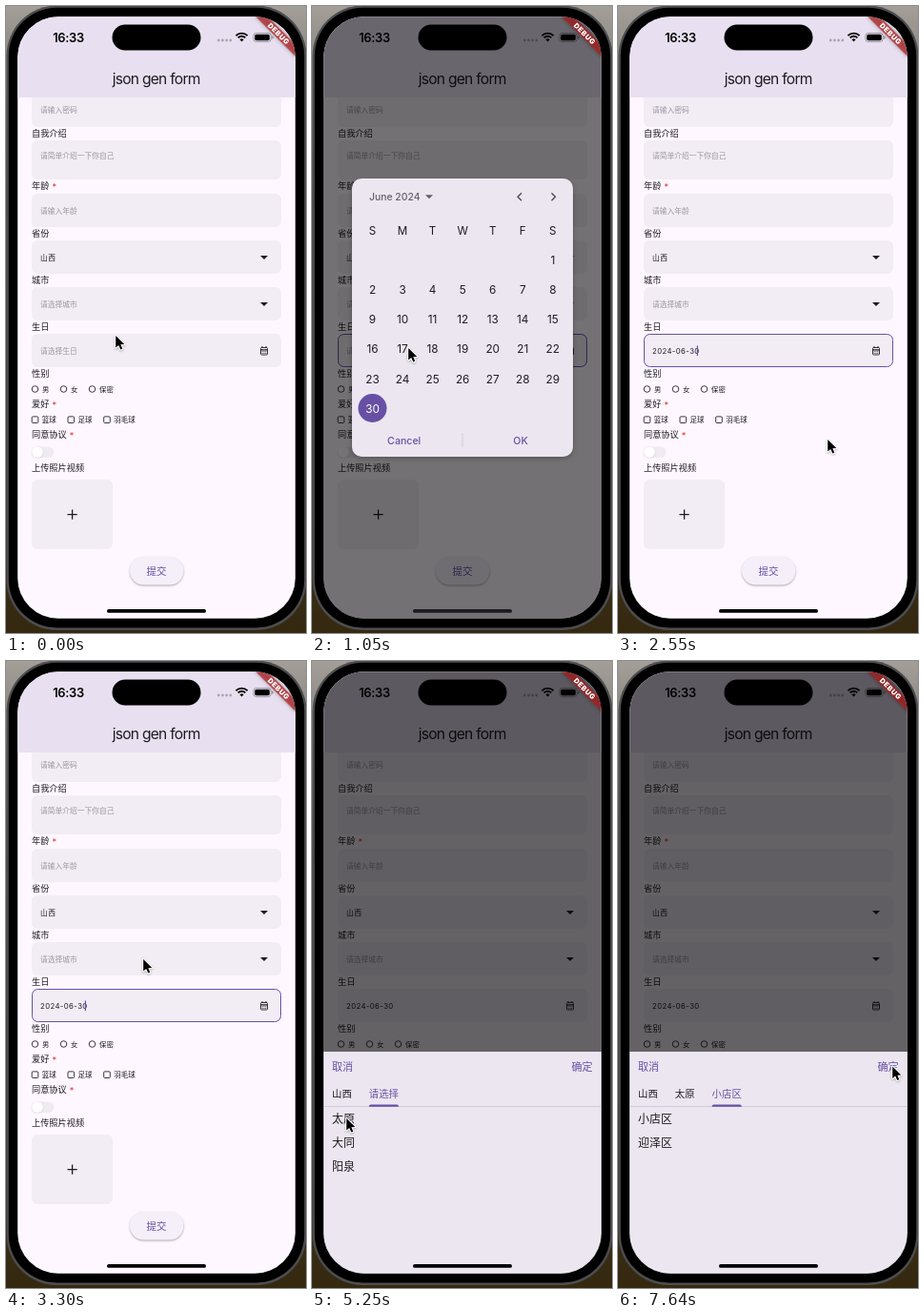
These frames come from a looping animation (315x658 px, 8 s). An HTML page with a canvas:

```html
<!DOCTYPE html>
<html lang="zh-CN">
<head>
<meta charset="utf-8">
<title>json gen form</title>
<style>
html, body { margin: 0; width: 100%; height: 100%; overflow: hidden; background: #000; }
canvas { display: block; width: 315px; height: 658px; }
</style>
</head>
<body>
<canvas id="stage"></canvas>
<script>
const W = 315, H = 658, LOOP = 8000;
const INK = '#1d1b20', HINT = '#9b96a0', PURPLE = '#6750a4', FIELD = '#f2ecf5', SHEET = '#ece6f0';
const FAMILY = 'Inter, "Noto Sans CJK SC", "Noto Sans CJK", sans-serif';

const canvas = document.getElementById('stage');
const ctx = canvas.getContext('2d');
const ratio = window.devicePixelRatio || 1;
canvas.width = W * ratio;
canvas.height = H * ratio;

function box(x, y, w, h, r, fill, stroke, line = 1) {
  ctx.beginPath();
  ctx.roundRect(x, y, w, h, r);
  if (fill) { ctx.fillStyle = fill; ctx.fill(); }
  if (stroke) { ctx.strokeStyle = stroke; ctx.lineWidth = line; ctx.stroke(); }
}

function disc(x, y, r, fill, stroke) {
  ctx.beginPath();
  ctx.arc(x, y, r, 0, Math.PI * 2);
  if (fill) { ctx.fillStyle = fill; ctx.fill(); }
  if (stroke) { ctx.strokeStyle = stroke; ctx.lineWidth = 1; ctx.stroke(); }
}

function poly(points, fill) {
  ctx.beginPath();
  points.forEach(([x, y]) => ctx.lineTo(x, y));
  ctx.closePath();
  ctx.fillStyle = fill;
  ctx.fill();
}

function strokeLine(points, color, width) {
  ctx.beginPath();
  points.forEach(([x, y], i) => i ? ctx.lineTo(x, y) : ctx.moveTo(x, y));
  ctx.strokeStyle = color;
  ctx.lineWidth = width;
  ctx.stroke();
}

// y is the vertical middle of the text
function text(str, x, y, size, color = INK, { align = 'left', weight = 400, spacing = 0 } = {}) {
  ctx.font = `${weight} ${size}px ${FAMILY}`;
  ctx.letterSpacing = spacing + 'px';
  ctx.textAlign = align;
  ctx.fillStyle = color;
  ctx.fillText(str, x, y + size * 0.37);
}

function shadow(color, blur, dy) {
  ctx.shadowColor = color;
  ctx.shadowBlur = blur * ratio;
  ctx.shadowOffsetY = dy * ratio;
}
const noShadow = () => shadow('transparent', 0, 0);

const arrowDown = (x, y, color = INK) => poly([[x - 4, y - 2], [x + 4, y - 2], [x, y + 2]], color);

function label(str, y, required) {
  text(str, 27, y, 9.2);
  if (required) text('*', 27 + str.length * 9.2 + 3, y + 0.5, 9.2, '#e5322d');
}

function field(y, h, str, filled, border) {
  box(27, y, 262, h, 6, FIELD);
  if (border) box(27.5, y + 0.5, 261, h - 1, 6, null, border);
  const color = filled ? INK : HINT;
  text(str, 36, y + (h > 36 ? 16.5 : 18), 7.75, color, { spacing: filled ? 0.4 : 0 });
}

function calendarIcon(x, y) {
  box(x - 3.5, y - 3.5, 7, 7.5, 1, null, INK, 0.9);
  strokeLine([[x - 3.5, y - 1.2], [x + 3.5, y - 1.2]], INK, 1.2);
  [-2, 2].forEach(d => strokeLine([[x + d, y - 5], [x + d, y - 3]], INK, 1));
  [-1.8, 0, 1.8].forEach(dx => [0.7, 2.4].forEach(dy => {
    ctx.fillStyle = INK;
    ctx.fillRect(x + dx - 0.45, y + dy - 0.45, 0.9, 0.9);
  }));
}

function form(t) {
  ctx.fillStyle = '#fef7ff';
  ctx.fillRect(12, 11, 292, 632);

  const dated = t >= 2550;
  const typing = t >= 2550 && t < 4050;
  const dateFocus = typing || (t >= 1050 && t < 1200);
  const cityFocus = t >= 4050 && t < 4200;

  field(91.5, 35.5, '请输入密码');
  label('自我介绍', 133.5);
  field(141, 41, '请简单介绍一下你自己');
  label('年龄', 189, true);
  field(197, 35, '请输入年龄');
  label('省份', 239);
  field(246, 35, '山西', true);
  arrowDown(271, 264);
  label('城市', 288);
  field(295, 35, '请选择城市', false, cityFocus && '#79747e');
  arrowDown(271, 313);
  label('生日', 337);
  field(344, 35, dated ? '2024-06-30' : '请选择生日', dated, dateFocus && PURPLE);
  calendarIcon(271, 362);
  if (typing) { ctx.fillStyle = PURPLE; ctx.fillRect(82.8, 356.5, 1.2, 10.5); }

  label('性别', 385.5);
  [['男', 30.5], ['女', 60.5], ['保密', 90.5]].forEach(([s, x]) => {
    disc(x, 402, 3.3, null, '#39363d');
    text(s, x + 7.5, 402, 7.4);
  });
  label('爱好', 418, true);
  [['篮球', 30.5], ['足球', 68.3], ['羽毛球', 106]].forEach(([s, x]) => {
    box(x - 3.3, 430.9, 6.6, 6.6, 1, null, '#39363d');
    text(s, x + 7.2, 434.5, 7.5);
  });
  label('同意协议', 450, true);
  box(27, 462.5, 23.5, 11.5, 5.75, '#f0eaf3');
  shadow('rgba(0,0,0,.12)', 2, 0.6);
  disc(33, 468.2, 5.8, '#fffdff');
  noShadow();

  label('上传照片视频', 485);
  box(27, 497, 85, 73, 6, FIELD);
  strokeLine([[64.5, 533.7], [74.7, 533.7]], INK, 1.3);
  strokeLine([[69.6, 528.6], [69.6, 538.8]], INK, 1.3);

  shadow('rgba(0,0,0,.32)', 2, 1);
  box(130, 578, 56.5, 29.5, 14.75, '#f5eff9');
  noShadow();
  text('提交', 158, 593, 10.5, PURPLE, { align: 'center', weight: 500 });

  ctx.fillStyle = '#e8e0f0';
  ctx.fillRect(12, 11, 292, 85);
  text('json gen form', 157.7, 76.3, 15.6, INK, { align: 'center', spacing: -0.75 });
}

function barrier(alpha) {
  ctx.fillStyle = `rgba(0,0,0,${alpha})`;
  ctx.fillRect(12, 11, 292, 632);
}

function datePicker() {
  const mid = { align: 'center' };
  shadow('rgba(0,0,0,.25)', 5, 2);
  box(42, 181, 232, 292, 10, SHEET);
  noShadow();
  text('June 2024', 60, 200.3, 10.4, '#66616b', { weight: 500 });
  arrowDown(123, 200.3, '#625d67');
  [[218, -1], [253.5, 1]].forEach(([x, d]) =>
    strokeLine([[x - 2 * d, 196.3], [x + 2 * d, 200.3], [x - 2 * d, 204.3]], '#49454f', 1.3));

  const col = i => 63.5 + i * 31.55;
  [...'SMTWTFS'].forEach((d, i) => text(d, col(i), 235.7, 11.6, INK, mid));
  disc(63.5, 422, 15, PURPLE);
  for (let day = 1; day <= 30; day++) {
    const cell = day + 5;
    const y = 266.8 + Math.floor(cell / 7) * 31.1;
    text(String(day), col(cell % 7), y, 11.8, day === 30 ? '#fff' : INK, mid);
  }
  text('Cancel', 96.7, 455.6, 10.6, PURPLE, { align: 'center', weight: 500 });
  text('OK', 219, 455.6, 10.6, PURPLE, { align: 'center', weight: 500 });
  ctx.fillStyle = '#d3ccd9';
  ctx.fillRect(157.5, 448, 1, 15);
}

function citySheet(t) {
  let tabs = ['请选择'], rows = ['山西', '陕西'];
  if (t >= 5250) { tabs = ['山西', '请选择']; rows = ['太原', '大同', '阳泉']; }
  if (t >= 6140) { tabs = ['山西', '太原', '请选择']; rows = ['小店区', '迎泽区']; }
  if (t >= 6890) tabs[2] = '小店区';

  ctx.fillStyle = SHEET;
  ctx.fillRect(12, 410, 292, 233);
  text('取消', 21, 426, 11.1, PURPLE);
  text('确定', 294.7, 426, 11.1, PURPLE, { align: 'right' });
  ctx.fillStyle = '#cfc8d5';
  ctx.fillRect(12, 467, 292, 0.9);
  let x = 21;
  tabs.forEach((name, i) => {
    const last = i === tabs.length - 1;
    const w = name.length * 10.4;
    text(name, x, 454, 10.4, last ? PURPLE : INK);
    if (last) box(x, 465.6, w, 2.2, [2, 2, 0, 0], PURPLE);
    x += w + 18;
  });
  rows.forEach((name, i) => text(name, 21, 480.8 + i * 25, 12));
}

function statusBar() {
  text('16:33', 65.5, 33, 12.9, '#000', { align: 'center', weight: 600, spacing: -0.3 });
  box(111.5, 19.5, 93, 27, 13.5, '#000');
  for (let i = 0; i < 4; i++) disc(223.2 + i * 4.2, 36, 1.4, 'rgba(0,0,0,.27)');

  ctx.strokeStyle = '#000';
  ctx.lineWidth = 1.9;
  [8.6, 5.4].forEach(r => {
    ctx.beginPath();
    ctx.arc(247.5, 37.2, r, -Math.PI * 0.75, -Math.PI * 0.25);
    ctx.stroke();
  });
  poly([[245.3, 35.1], [247.5, 34.2], [249.7, 35.1], [247.5, 37.4]], '#000');

  box(259.8, 28.4, 18.4, 9.2, 3, null, 'rgba(0,0,0,.4)', 0.8);
  box(261.2, 29.8, 15.6, 6.4, 1.8, '#000');
  box(279.3, 31.4, 1.2, 3.2, 0.6, 'rgba(0,0,0,.45)');
}

function banner() {
  ctx.save();
  ctx.translate(304, 11);
  ctx.rotate(Math.PI / 4);
  shadow('rgba(0,0,0,.5)', 4, 0);
  box(-29.7, 20.8, 59.4, 8.9, 0, 'rgba(183,28,28,.68)');
  noShadow();
  text('DEBUG', 0.3, 25.3, 7.4, '#fff', { align: 'center', weight: 900, spacing: 0.6 });
  ctx.restore();
}

function phone() {
  const wall = ctx.createLinearGradient(0, 0, 0, H);
  wall.addColorStop(0, '#a39e98');
  wall.addColorStop(0.3, '#55514d');
  wall.addColorStop(1, '#34290f');
  ctx.fillStyle = wall;
  ctx.fillRect(0, 0, W, H);
  box(0.5, -0.5, 315, 655.5, 53, '#4d4d50');
  box(2.8, 1.8, 310.4, 650.6, 50.5, '#000');
}

function pointer([x, y]) {
  ctx.save();
  ctx.translate(x, y);
  ctx.beginPath();
  [[1.2, 2], [1.2, 14.6], [4.2, 11.9], [6.3, 16.6], [8.3, 15.7], [6.3, 11.2], [10.3, 11]]
    .forEach(([px, py]) => ctx.lineTo(px, py));
  ctx.closePath();
  ctx.fillStyle = '#000';
  ctx.strokeStyle = '#fff';
  ctx.lineWidth = 2.3;
  ctx.lineJoin = 'round';
  shadow('rgba(0,0,0,.3)', 2, 0.8);
  ctx.stroke();
  noShadow();
  ctx.fill();
  ctx.restore();
}

// moves: start time, steps of 150 ms, from, to
const moves = [
  [1050, 5, [100, 357], [219, 453]],
  [2550, 5, [219, 453], [143, 311]],
  [4050, 5, [143, 311], [35, 478]],
  [5250, 3, [35, 478], [34.5, 480]],
  [6140, 2, [34.5, 480], [36, 481]],
  [6890, 5, [36, 481], [287, 423.5]]
];

function pointerAt(t) {
  if (t < 150) return [114, 344];
  if (t < 300) return [103, 374];
  let pos = [100, 357];
  for (const [start, steps, a, b] of moves) {
    if (t < start) break;
    const k = Math.min(1, Math.floor((t - start) / 150) / steps);
    const e = k * k * (3 - 2 * k);
    pos = a.map((v, i) => v + (b[i] - v) * e);
  }
  return pos;
}

function draw(t) {
  ctx.setTransform(ratio, 0, 0, ratio, 0, 0);
  phone();
  ctx.save();
  ctx.beginPath();
  ctx.roundRect(12.2, 11.2, 291.6, 631.6, 42.5);
  ctx.clip();
  form(t);
  const picking = t >= 1050 && t < 2550;
  const choosing = t >= 4050;
  if (picking) {
    barrier(0.54);
    datePicker();
  }
  if (choosing) {
    barrier(0.6);
    citySheet(t);
  }
  statusBar();
  banner();
  box(106, 633, 104, 3.8, 1.9, picking ? '#1c1b1d' : '#000');
  ctx.restore();
  pointer(pointerAt(t));
}

const begin = performance.now();
function tick() {
  draw((performance.now() - begin) % LOOP);
  requestAnimationFrame(tick);
}
tick();
</script>
</body>
</html>
```
